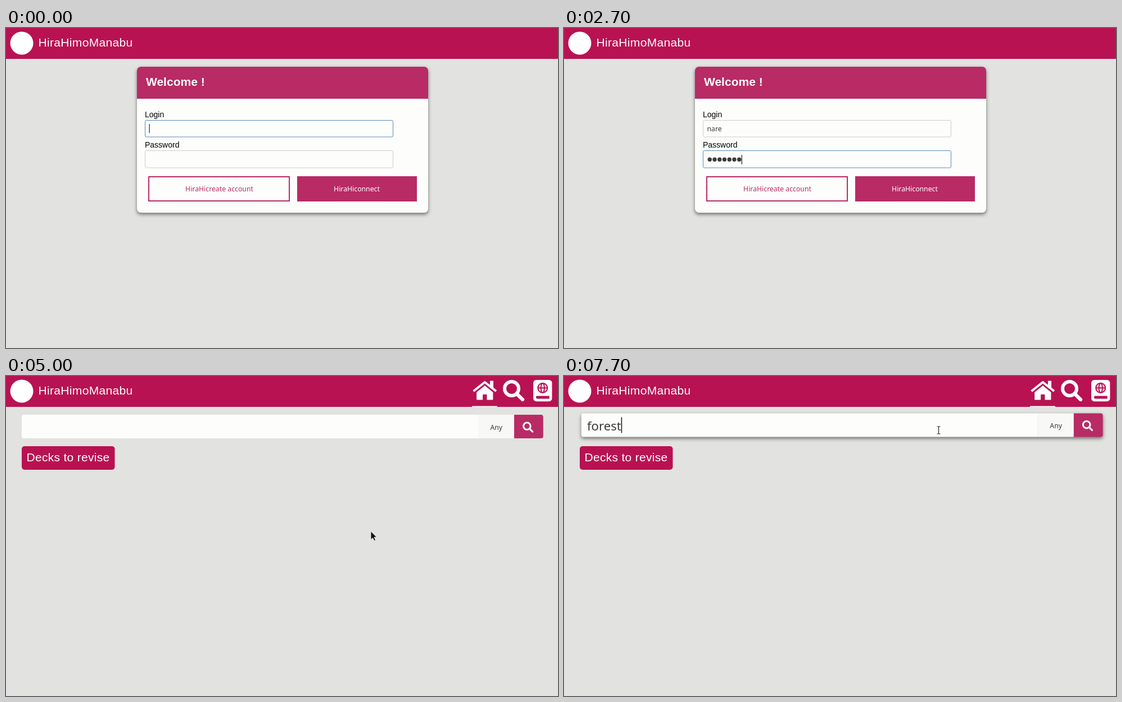
Write an HTML page that moves like this. It is 982 px wide and 570 px high and loops after 8000 ms.

```html
<!DOCTYPE html>
<html lang="en">
<head>
<meta charset="utf-8">
<title>Login and search</title>
<style>
  html, body { margin: 0; height: 100%; overflow: hidden; background: #e2e2e0; }
  svg { display: block; width: 982px; height: 570px; }
  text { font: 12.25px "Noto Sans", sans-serif; fill: #3b3b3b; white-space: pre; }
  .sans { font: 14px "Liberation Sans", Arial, sans-serif; fill: #000; }
  .title { font-size: 21px; fill: #fff; }
  .query { font-size: 22.2px; }
  .mid { text-anchor: middle; }
  .field { fill: #fdfefc; stroke: #cdcdcb; }
  .field.focus { stroke: #5b8abb; }
  .caret { stroke: #222; stroke-width: 1.2; }
  .main { fill: #b81252; }
  .soft { fill: #b82b65; }
  .card { filter: drop-shadow(0 3px 3px rgba(0, 0, 0, .5)); }
</style>
</head>
<body>
<svg viewBox="0 0 982 570">
  <defs>
    <g id="lens" fill="none" stroke="#fff">
      <circle cx="208" cy="208" r="168" stroke-width="80"/>
      <path d="M325 325L470 470" stroke-width="84" stroke-linecap="round"/>
    </g>
  </defs>

  <rect class="main" width="982" height="55"/>
  <circle cx="28" cy="27" r="20.5" fill="#fff"/>
  <text class="sans title" x="57.5" y="32.5" letter-spacing=".33">HiraHimoManabu</text>

  <g id="loginPage">
    <g class="card">
      <rect class="soft" x="233" y="69" width="518" height="260" rx="7"/>
      <path d="M233 126h518v196a7 7 0 0 1-7 7h-504a7 7 0 0 1-7-7z" fill="#fdfefc"/>
    </g>
    <text class="sans title" x="249" y="102.5" font-weight="bold" style="font-weight:bold">Welcome !</text>
    <text class="sans" x="247" y="158.5">Login</text>
    <rect id="login" class="field" x="247.5" y="164.5" width="441" height="29.5" rx="2"/>
    <text id="loginText" x="254.5" y="184"></text>
    <path id="loginCaret" class="caret"/>
    <text class="sans" x="247" y="213">Password</text>
    <rect id="pass" class="field" x="247.5" y="218.5" width="441" height="30.5" rx="2"/>
    <path id="dots" stroke="#3b3b3b" stroke-width="7.4" stroke-linecap="round" stroke-dasharray="0 8.75"/>
    <path id="passCaret" class="caret"/>
    <rect x="254" y="265" width="250" height="43" fill="#fdfefc" stroke="#b82b65" stroke-width="2"/>
    <text class="mid" x="379.5" y="290.5" style="fill:#b82b65">HiraHicreate account</text>
    <g id="connect">
      <rect class="soft" x="518" y="264" width="213" height="45"/>
      <text class="mid" x="624" y="290.5" style="fill:#fff">HiraHiconnect</text>
    </g>
    <rect id="outline" x="531.5" y="276.5" width="186" height="15" fill="none" stroke="#5a1a38" stroke-dasharray="1 1"/>
  </g>

  <g id="homePage">
    <g transform="translate(829.8 6) scale(.0763)" fill="#fff">
      <path d="M288 143L96 300v164q0 16 16 16h112q16 0 16-16v-96q0-16 16-16h64q16 0 16 16v96q0 16 16 16h112q16 0 16-16V300z"/>
      <path d="M24 276L288 66 552 276" fill="none" stroke="#fff" stroke-width="52" stroke-linejoin="round"/>
      <rect x="408" y="32" width="80" height="170" rx="12"/>
    </g>
    <rect x="829" y="53.5" width="45" height="1.5" fill="#fff"/>
    <use href="#lens" transform="translate(884 7) scale(.0745)"/>
    <g transform="translate(938 7) scale(.0745)">
      <rect width="448" height="512" rx="70" fill="#fff"/>
      <path class="main" d="M96 384h288v64H96a32 32 0 0 1 0-64z"/>
      <g fill="none" stroke="#b81252" stroke-width="28">
        <circle cx="224" cy="192" r="113"/>
        <ellipse cx="224" cy="192" rx="42" ry="113"/>
        <path d="M111 192h226"/>
      </g>
    </g>

    <g id="bar">
      <path d="M32 69h808v42H32a4 4 0 0 1-4-4V73a4 4 0 0 1 4-4z" fill="#fdfefc"/>
      <path d="M840 69h64v42h-64z" fill="#f8f8f6"/>
      <path class="soft" d="M904 69h47.7a4 4 0 0 1 4 4v34a4 4 0 0 1-4 4H904z"/>
      <text class="mid" x="872.3" y="95.5">Any</text>
      <use href="#lens" transform="translate(919 81.5) scale(.0375)"/>
      <text id="query" class="query" x="38" y="99.4"></text>
      <path id="queryCaret" class="caret" style="stroke-width:1.6"/>
    </g>
    <rect class="main" x="28" y="125" width="165.5" height="42" rx="5"/>
    <text class="sans title" x="36.5" y="152" letter-spacing=".3">Decks to revise</text>
  </g>

  <g id="mouse">
    <path id="arrow" d="M0 0V15L3.5 12 6 17 8.5 16 6 10.7H10.5z" fill="#111" stroke="#fff" stroke-width=".8"/>
    <g id="beam" fill="none">
      <path d="M-3-6.5h6M0-6.5v13M-3 6.5h6" stroke="#fff" stroke-width="2.4"/>
      <path d="M-3-6.5h6M0-6.5v13M-3 6.5h6" stroke="#222" stroke-width="1.2"/>
    </g>
  </g>
</svg>
<script>
const $ = id => document.getElementById(id);
const show = (id, on) => $(id).style.display = on ? '' : 'none';

const loginKeys = [400, 600, 700, 800];
const passKeys = [1600, 1800, 2100, 2300, 2500, 2600, 2700];
const queryKeys = [7000, 7100, 7200, 7300, 7500, 7700];
const typed = (keys, t) => keys.filter(k => k <= t).length;

// time, x, y
const mousePath = [
  [3500, 966, 30], [3700, 835, 150], [3900, 700, 245], [4000, 674, 262],
  [4100, 661, 270], [4300, 649, 276.5], [5300, 649, 276.5], [5400, 660, 250],
  [5500, 688, 200], [5600, 697, 150], [5700, 682, 110], [5800, 667, 97.5],
  [6300, 667, 97.5], [6400, 666.5, 96.5], [8000, 666.5, 96.5]
];
const buttonLift = [[4000, 0], [4300, 1], [8000, 1]];
const barLift = [[6000, 0], [6100, .5], [6200, .9], [6300, .9], [6400, 1], [8000, 1]];

function at(path, t) {
  if (t <= path[0][0]) return path[0].slice(1);
  const i = path.findIndex(p => p[0] >= t), a = path[i - 1], b = path[i];
  const f = (t - a[0]) / (b[0] - a[0]);
  return a.slice(1).map((v, k) => v + (b[k + 1] - v) * f);
}

const shadow = k => k ? `drop-shadow(0 ${3 * k}px ${3 * k}px rgba(0,0,0,${.5 * k}))` : '';

function setCaret(id, x, y, h) {
  $(id).setAttribute('d', `M${x} ${y}v${h}`);
}

function typeText(id, text, keys, t, y, h) {
  const el = $(id + 'Text') || $(id);
  el.textContent = text.slice(0, typed(keys, t));
  setCaret(id + 'Caret', +el.getAttribute('x') + .6 + el.getComputedTextLength(), y, h);
}

function draw(now) {
  const t = Math.floor(now % 8000 / 100) * 100;
  const home = t >= 5000;
  show('loginPage', !home);
  show('homePage', home);

  if (!home) {
    const inLogin = t < 1100, inPass = t >= 1500 && t < 4400;
    $('login').classList.toggle('focus', inLogin);
    $('pass').classList.toggle('focus', inPass);
    typeText('login', 'nare', loginKeys, t, 171, 16);
    show('loginCaret', inLogin);

    const n = typed(passKeys, t);
    $('dots').setAttribute('d', n ? `M259.2 234.3h${8.75 * (n - 1) + .1}` : '');
    setCaret('passCaret', 255.1 + 8.75 * n, 226, 17);
    show('passCaret', inPass && t < 3500);

    const [k] = at(buttonLift, t);
    $('connect').setAttribute('transform', `translate(0 ${-2.5 * k})`);
    $('connect').style.filter = shadow(k * .8);
    show('outline', t >= 4400);
  } else {
    const [k] = at(barLift, t);
    $('bar').setAttribute('transform', `translate(${2.9 * k} ${-2.6 * k})`);
    $('bar').style.filter = shadow(k);
    typeText('query', 'forest', queryKeys, t, 76, 28);
    show('queryCaret', t >= 6100);
  }

  const [x, y] = at(mousePath, t), beam = t >= 5800;
  show('mouse', t >= 3500);
  show('arrow', !beam);
  show('beam', beam);
  $('mouse').setAttribute('transform', `translate(${x} ${y})`);
}

const start = performance.now();
(function frame() {
  draw(performance.now() - start);
  requestAnimationFrame(frame);
})();
</script>
</body>
</html>
```
